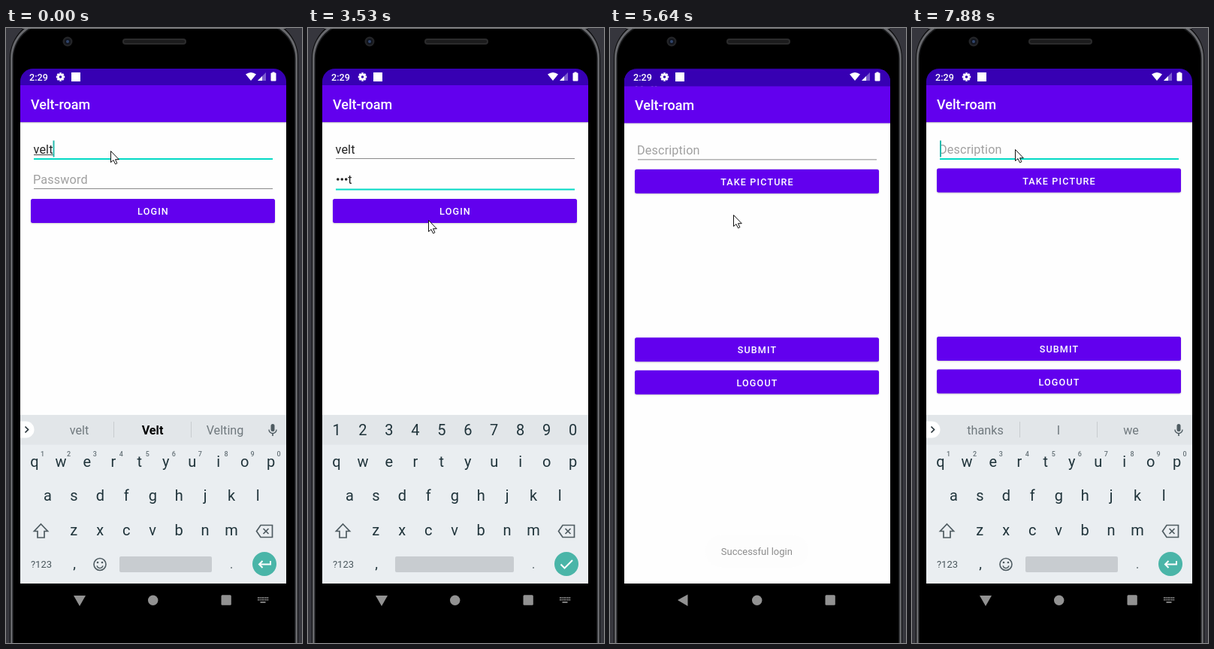
Write an HTML page with a canvas that moves like this. It is 394 px wide and 817 px high and loops after 8 s.

```html
<!DOCTYPE html>
<html lang="en">
<head>
<meta charset="utf-8">
<title>Phone login</title>
<style>
html, body { margin: 0; width: 100%; height: 100%; overflow: hidden; background: #000; }
canvas { display: block; width: 394px; height: 817px; }
</style>
</head>
<body>
<canvas id="stage"></canvas>
<script>
const W = 394, H = 817, LOOP = 8000;
const canvas = document.getElementById('stage');
const ctx = canvas.getContext('2d');
const ratio = window.devicePixelRatio || 1;
canvas.width = W * ratio;
canvas.height = H * ratio;

const PURPLE = '#6200ee', TEAL = '#03dac5', INK = '#20343b', ICON = '#4f5c62';
const USER = 'velt';
const SCREEN = { x: 19, y: 54, w: 354, h: 684 };

const TICKS = [0, 430, 710, 850, 990, 1140, 1420, 1570, 1850, 2000, 2150, 2430, 2550,
  3140, 3270, 3400, 3540, 3670, 3800, 4100, 4240, 4380, 4630, 5060, 5340, 5490, 5640,
  5760, 6070, 6220, 6340, 6490, 6640, 6760, 6910, 7030, 7150, 7300, 7450, 7600, 7730, 7880];

const POINTER = [[600, 139, 163], [1140, 139, 190], [3000, 139, 190], [3540, 164, 268],
  [3800, 164, 248], [5950, 164, 248], [6490, 137, 161]];

const within = (t, a, b) => t >= a && t < b;
const clamp = v => Math.max(0, Math.min(1, v));

function rect(x, y, w, h, color) {
  ctx.fillStyle = color;
  ctx.fillRect(x, y, w, h);
}

function round(x, y, w, h, r, color) {
  ctx.beginPath();
  ctx.roundRect(x, y, w, h, r);
  ctx.fillStyle = color;
  ctx.fill();
}

function circle(x, y, r, color) {
  ctx.beginPath();
  ctx.arc(x, y, r, 0, Math.PI * 2);
  ctx.fillStyle = color;
  ctx.fill();
}

function path(points, closed) {
  ctx.beginPath();
  points.forEach(([x, y], i) => i ? ctx.lineTo(x, y) : ctx.moveTo(x, y));
  if (closed) ctx.closePath();
}

function shape(points, color) {
  path(points, true);
  ctx.fillStyle = color;
  ctx.fill();
}

function line(points, color, width, closed) {
  path(points, closed);
  ctx.strokeStyle = color;
  ctx.lineWidth = width;
  ctx.stroke();
}

function text(s, x, y, size, color, { weight = 400, align = 'left', spacing = 0 } = {}) {
  ctx.font = `${weight} ${size}px Roboto, sans-serif`;
  ctx.textAlign = align;
  ctx.letterSpacing = spacing + 'px';
  ctx.fillStyle = color;
  ctx.fillText(s, x, y);
}

const centered = (s, x, y, size, color, weight) =>
  text(s, x, y, size, color, { align: 'center', weight });

const fieldText = (s, x, y, color) => text(s, x, y, 16.2, color, { spacing: 0.15 });
const hint = (s, y) => fieldText(s, 36, y, '#a0a0a0');

function fieldWidth(s) {
  ctx.font = '400 16.2px Roboto, sans-serif';
  ctx.letterSpacing = '0.15px';
  return ctx.measureText(s).width;
}

// Runs a drawing inside its own saved state.
function layer(draw) {
  ctx.save();
  draw();
  ctx.restore();
}

function phone() {
  rect(0, 0, W, H, '#36363d');
  round(5, -12, 384, 900, 52, '#0b0b0c');
  round(6, -10, 382, 900, 50, '#68696d');
  round(8.5, -7, 377, 900, 48, '#1c1d1f');
  round(10, -5, 374, 900, 46, '#000');
  rect(22, 0, 350, 1, '#77787b');
  round(155, 14, 85, 8, 4, '#2b2b2c');
  round(157, 16, 81, 4, 2, '#1c1c1d');
  circle(82, 18, 6.5, '#232427');
  circle(82, 18, 4, '#11141c');
  circle(82, 18, 2, '#31456d');
}

function statusIcons() {
  text('2:29', 31, 69.5, 12.6, '#fff', { weight: 500 });
  layer(() => {
    ctx.translate(72.5, 65);
    for (let i = 0; i < 4; i++) {
      ctx.rotate(Math.PI / 4);
      rect(-1.4, -5.7, 2.8, 11.4, '#fff');
    }
    circle(0, 0, 4.3, '#fff');
    circle(0, 0, 1.8, '#3700b3');
  });
  rect(87, 59, 12, 12, '#fff');
  ctx.beginPath();
  ctx.moveTo(326, 70);
  ctx.lineTo(319, 61.5);
  ctx.quadraticCurveTo(326, 56.5, 333, 61.5);
  ctx.fillStyle = '#fff';
  ctx.fill();
  shape([[335, 70], [346, 70], [346, 59]], '#7c5ccf');
  shape([[335, 70], [341, 70], [341, 64]], '#fff');
  rect(354.5, 58.5, 3, 2, '#fff');
  round(352.5, 59.5, 7, 11, 1, '#fff');
}

function button(label, y, lit) {
  layer(() => {
    ctx.shadowColor = lit ? 'rgba(0,0,0,.3)' : 'rgba(0,0,0,.18)';
    ctx.shadowBlur = lit ? 5 : 2;
    ctx.shadowOffsetY = lit ? 2 : 1;
    round(33, y, 325, 32, 2.5, PURPLE);
  });
  if (lit) round(33, y, 325, 32, 2.5, 'rgba(255,255,255,.18)');
  text(label, 196, y + 21, 12.6, '#fff', { weight: 500, align: 'center', spacing: 1.125 });
}

function underline(y, focused) {
  if (focused) rect(37, y, 318, 2, TEAL);
  else rect(37, y, 318, 1, '#8a8a8a');
}

const caret = (x, y) => rect(x, y, 2, 22, '#26b9ac');

function pageBase() {
  rect(19, 125, 354, 613, '#fefefe');
  rect(19, 125, 354, 1, '#c4c0cc');
  rect(19, 126, 354, 1, '#efeff1');
  rect(19, 76, 354, 49, PURPLE);
  rect(19, 54, 354, 22, '#3700b3');
  text('Velt-roam', 33, 108, 18, '#fff', { weight: 500 });
}

function password(t) {
  const typed = t < 2150 ? 0 : t < 2430 ? 1 : t < 2550 ? 3 : 4;
  const shown = typed && t < 4100 ? USER[typed - 1] : '';
  const dots = typed - shown.length;
  if (!typed) hint('Password', 207);
  for (let i = 0; i < dots; i++) circle(39.8 + i * 5.45, 201, 1.8, '#222');
  let end = 37 + dots * 5.45;
  if (shown) {
    fieldText(shown, end, 207, '#222');
    end += fieldWidth(shown);
  }
  const on = within(t, 1570, 3140) || within(t, 3540, 4100) || within(t, 4630, 5060);
  if (on) caret(Math.round(end - 0.5), 190);
}

function loginPage(t) {
  const second = t >= 1420;
  pageBase();
  fieldText(USER, 36.5, 166.5, '#222');
  if (!second) {
    rect(37, 168, 26, 1, '#444');
    if (t < 430 || t >= 990) caret(62.5, 149.5);
  }
  underline(173, !second);
  password(t);
  underline(second ? 213.5 : 213, second);
  button('LOGIN', 227, within(t, 4240, 4380));
}

function mainPage(t) {
  const focused = t >= 6910;
  pageBase();
  hint('Description', 166.5);
  underline(173, focused);
  if (focused) caret(37, 149.5);
  button('TAKE PICTURE', 186.5);
  button('SUBMIT', 410);
  button('LOGOUT', 453.5);
}

function pages(t) {
  if (t < 5340) return loginPage(t);
  const age = t - 5340;
  if (age < 420) {
    layer(() => {
      ctx.translate(0, -5 - age * 0.05);
      loginPage(t);
    });
    rect(19, 54, 354, 684, 'rgba(0,0,0,.1)');
  }
  layer(() => {
    const top = age < 420 ? 128 * Math.exp(-age / 75) : 0;
    ctx.beginPath();
    ctx.rect(19, 54 + top, 354, 684);
    ctx.clip();
    if (age < 420) ctx.translate(0, 18.5 * Math.exp(-age / 115));
    mainPage(t);
  });
}

function suggestions(words, bold) {
  round(19, 522.5, 18.5, 22, [0, 11, 11, 0], '#fff');
  line([[25.5, 529.5], [29.5, 533.5], [25.5, 537.5]], '#263238', 1.7);
  [97.5, 195, 291.5].forEach((x, i) => {
    const strong = bold && i === 1;
    centered(words[i], x, 540, 16.2, strong ? '#000' : '#70797e', strong ? 700 : 400);
  });
  rect(143, 523, 1, 21, '#c8cdd0');
  rect(246, 523, 1, 21, '#c8cdd0');
  round(352.5, 526, 5, 10, 2.5, ICON);
  ctx.beginPath();
  ctx.arc(355, 533.5, 5, 0, Math.PI);
  ctx.strokeStyle = ICON;
  ctx.lineWidth = 1.4;
  ctx.stroke();
  rect(354.2, 538.5, 1.6, 3.5, ICON);
}

function smiley() {
  ctx.strokeStyle = ICON;
  ctx.lineWidth = 1.6;
  ctx.beginPath();
  ctx.arc(125, 712.5, 8, 0, Math.PI * 2);
  ctx.stroke();
  ctx.beginPath();
  ctx.arc(125, 713.5, 4, 0.2, Math.PI - 0.2);
  ctx.stroke();
  circle(122, 710, 1.3, ICON);
  circle(128, 710, 1.3, ICON);
}

function keyboard(numeric, words, bold) {
  rect(19, 514, 354, 224, '#eaeef1');
  rect(19, 514, 354, 39.5, '#e2e6e9');
  if (!numeric) suggestions(words, bold);
  const pitch = 34.95;
  [...'1234567890'].forEach((digit, i) => {
    if (numeric) centered(digit, 38 + i * pitch, 541, 20, INK);
    else centered(digit, 48.5 + i * pitch, 569, 9, '#667278', 500);
  });
  const rows = [['qwertyuiop', 38, 583], ['asdfghjkl', 55.5, 628], ['zxcvbnm', 90.3, 674]];
  for (const [keys, x, y] of rows) {
    [...keys].forEach((key, i) => centered(key, x + i * pitch, y, 20, INK));
  }
  line([[46.5, 659], [55.5, 668.5], [51, 668.5], [51, 677], [42, 677], [42, 668.5], [37.5, 668.5]],
    ICON, 1.7, true);
  line([[333.5, 668.5], [339, 660.5], [354.5, 660.5], [354.5, 676.5], [339, 676.5]], ICON, 1.7, true);
  line([[342.5, 665], [349.5, 672]], ICON, 1.7);
  line([[349.5, 665], [342.5, 672]], ICON, 1.7);
  centered('?123', 47, 717, 13, '#4a575d');
  centered(',', 91, 718, 19, INK);
  centered('.', 300, 718, 18, '#6c777c');
  if (!numeric) smiley();
  const left = numeric ? 116 : 151;
  round(left, 702, 274 - left, 21, 2, '#c8ccd0');
  circle(344, 712, 16, '#4ab5a8');
  if (numeric) {
    line([[336.5, 712.5], [341.5, 717.5], [352, 707]], '#fff', 2);
  } else {
    line([[352, 708], [352, 712.5], [337.5, 712.5]], '#fff', 2);
    line([[341.5, 708], [337, 712.5], [341.5, 717]], '#fff', 2);
  }
}

function keyboardLayer(t) {
  if (within(t, 5640, 7450)) return;
  const leaving = within(t, 5340, 5640);
  const entering = t >= 7450 && t < 7880;
  let shift = 0, alpha = 1;
  if (leaving) {
    const p = (t - 5340) / 150;
    shift = 18.5 + 11.5 * p;
    alpha = 0.65 - 0.4 * p;
  } else if (entering) {
    const p = (t - 7450) / 430;
    shift = 44 * (1 - p) ** 2;
    alpha = 0.3 + 0.7 * p;
  }
  layer(() => {
    ctx.translate(0, shift);
    if (leaving) rect(19, 514, 354, 224, `rgba(255,255,255,${clamp(alpha * 1.55)})`);
    ctx.globalAlpha = alpha;
    if (t < 1850) keyboard(false, [USER, 'Velt', 'Velting'], true);
    else if (t < 5640) keyboard(true);
    else keyboard(false, ['thanks', 'I', 'we'], false);
  });
}

function toast(t) {
  if (t < 5340 || t >= 7030) return;
  const alpha = t < 5490 ? 0.42 : 1 - clamp((t - 6640) / 390);
  layer(() => {
    ctx.globalAlpha = alpha;
    round(127, 673.5, 137, 43, 21.5, t < 5490 ? '#e9ebed' : '#fdfdfd');
    centered('Successful login', 195.3, 700, 13, '#8c8c8c');
  });
}

function navigation(t) {
  const typing = t < 5340 || t >= 7150;
  const gray = within(t, 5340, 5490) ? '#b9b9b9' : '#929292';
  if (typing) {
    shape([[90, 754], [106, 754], [98, 768]], gray);
    for (let row = 0; row < 2; row++) {
      for (let col = 0; col < 6; col++) rect(335 + col * 2.5, 756 + row * 2.8, 1.7, 1.7, gray);
    }
    rect(338.5, 762, 7, 1.7, gray);
  } else {
    shape([[90, 760], [103.5, 752.5], [103.5, 768]], gray);
  }
  circle(195.7, 760.2, 6.7, gray);
  round(286.5, 753.3, 13.3, 13.5, 1.5, gray);
}

function pointer(t) {
  let [, x, y] = POINTER[0];
  for (let i = 1; i < POINTER.length; i++) {
    const [t0, x0, y0] = POINTER[i - 1], [t1, x1, y1] = POINTER[i];
    if (t < t0) break;
    const p = clamp((t - t0) / (t1 - t0));
    const e = p * p * (3 - 2 * p);
    x = x0 + (x1 - x0) * e;
    y = y0 + (y1 - y0) * e;
  }
  layer(() => {
    ctx.translate(Math.round(x) + 0.5, Math.round(y) + 0.5);
    const arrow = [[0, 0], [0, 15], [3.5, 12], [6, 17.3], [8.4, 16.2], [6, 11.2], [10.8, 11.2]];
    shape(arrow, '#fff');
    line(arrow, '#111', 1, true);
  });
}

function render(now) {
  const time = now % LOOP;
  const t = TICKS.findLast(tick => tick <= time);
  ctx.setTransform(ratio, 0, 0, ratio, 0, 0);
  phone();
  layer(() => {
    ctx.beginPath();
    ctx.roundRect(SCREEN.x, SCREEN.y, SCREEN.w, SCREEN.h, [17, 17, 0, 0]);
    ctx.clip();
    pages(t);
    statusIcons();
  });
  keyboardLayer(t);
  toast(t);
  navigation(t);
  pointer(t);
}

const start = performance.now();
function loop() {
  render(performance.now() - start);
  requestAnimationFrame(loop);
}
loop();
</script>
</body>
</html>
```
